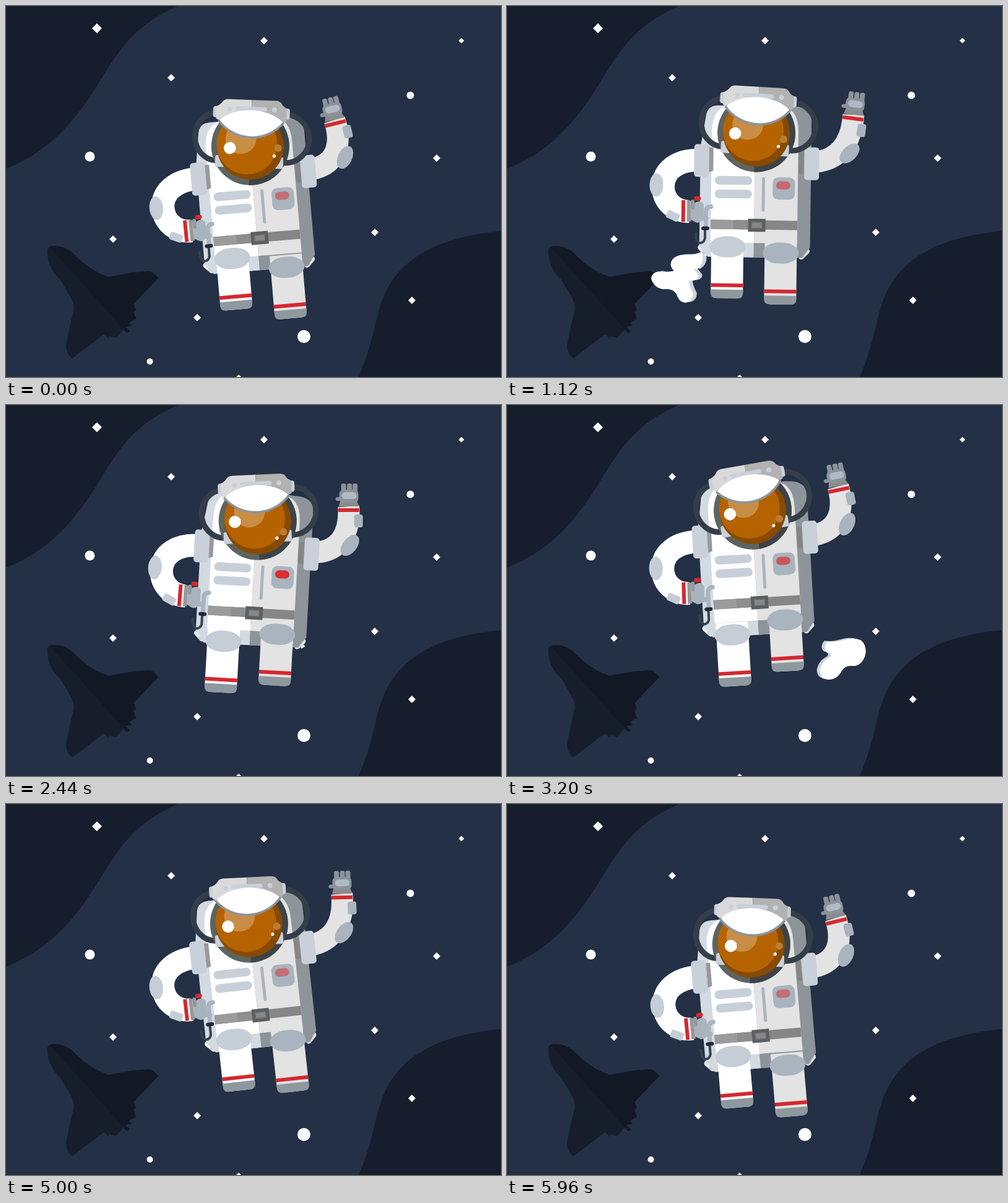
Write an HTML page that moves like this. It is 800x600 px and loops after 6 s.

```html
<!DOCTYPE html>
<html lang="en">
<head>
<meta charset="utf-8">
<title>Waving astronaut</title>
<style>
html, body { margin: 0; width: 100%; height: 100%; overflow: hidden; background: #233045; }
svg { display: block; width: 800px; height: 600px; }
</style>
</head>
<body>
<svg viewBox="0 0 800 600">
  <rect width="800" height="600" fill="#233045"/>
  <g fill="#161d2c">
    <path d="M278 0C215 28 190 60 160 108C125 165 85 230 0 263V0Z"/>
    <path d="M570 600C592 550 596 510 605 485C625 420 680 375 800 364V600Z"/>
  </g>
  <g id="shuttle">
    <path fill="#161d2b" d="M67 400Q65 388 76 388Q92 387 106 398L123 414Q145 432 166 438L205 431L232 429Q238 430 246 440L206 482L210 491L206 495L210 506L199 512L203 517L193 519L200 526L195 529L190 523L178 537L167 534L166 538L158 531L107 570Q98 563 97 550Q101 525 110 490Q109 478 104 470L88 443Q68 425 67 400Z"/>
    <path fill="#121925" d="M71 390Q88 385 106 398L123 414Q145 432 166 438L205 431L232 429Q238 430 246 440L206 482L210 491L206 495L210 506L199 512L203 517L193 519L200 526L196 529Z"/>
  </g>
  <g id="stars" fill="#fff"></g>

  <g id="puffL">
    <g id="puffLShape">
      <path class="neck" d="M323 394Q315 403 295 404L282 420L308 428Q322 420 318 402Z"/>
      <path d="M300 405Q278 401 269 412Q263 422 272 430Q258 434 246 431Q234 434 235 444Q240 458 254 460Q270 458 276 468Q280 482 292 482Q304 479 303 467Q296 454 296 446Q312 447 312 437Q306 430 302 425Q312 414 300 405Z"/>
    </g>
  </g>
  <g id="puffR">
    <g id="puffRShape">
      <path class="neck" d="M486 358Q491 374 512 384L507 404L532 398L530 383Q505 377 494 360Z"/>
      <path d="M516 382Q529 384 542 380Q559 375 570 380Q579 387 578 401Q574 420 559 422Q545 420 539 430Q532 444 517 444Q503 441 504 428Q507 416 516 410Q529 403 515 399Q508 392 516 382Z"/>
    </g>
  </g>

  <g id="body">
    <g stroke-linecap="round" stroke-width="9">
      <path d="M-86 102L-77 111" stroke="#ececec"/>
      <path d="M77 115L86 106" stroke="#e3e3e3"/>
      <path d="M-81 107L-77 111M81 111L77 115" stroke="#cdcdcd" stroke-linecap="butt"/>
    </g>
    <path fill="#d3dbe2" d="M-80 -110Q-78 -128 -60 -128H60V117H-74L-88 100V-60Z"/>
    <path fill="#8d959b" d="M0 -128H60Q90 -128 91 -105V100L78 117H0Z"/>
    <path fill="#fff" d="M-70 94V-85Q-70 -122 -45 -128H0V94Z"/>
    <path fill="#e3e3e3" d="M0 94V-128H45Q70 -122 70 -85V94Z"/>
    <path fill="#d3dbe2" d="M-18 94H0V117H-18Z"/>
    <path fill="#8d959b" d="M0 94H20V117H0Z"/>
    <path fill="#999" d="M-74 -60H-67V-22L-74 -20Z"/>
    <path fill="#858585" d="M71 -54H79V-18L71 -20Z"/>
    <g fill="#c8cfd8">
      <rect x="-64" y="-14" width="60" height="14" rx="7"/>
      <rect x="-64" y="8" width="60" height="14" rx="7"/>
    </g>
    <g fill="#a9b4be">
      <rect x="12" y="-13" width="5" height="56" rx="2.5"/>
      <rect x="29.5" y="-13" width="36" height="36" rx="9"/>
    </g>
    <rect id="lamp" x="35" y="-6.5" width="23" height="13" rx="6.5" fill="#dc2a32"/>
    <rect x="-70" y="57" width="140" height="15" fill="#868686"/>
    <rect x="-70" y="57" width="37" height="15" fill="#9b9b9b"/>
    <rect x="-33" y="57" width="24" height="15" fill="#8e8e8e"/>
    <rect x="-9.5" y="54.5" width="28" height="21" fill="#5c5f60"/>
    <rect x="-4" y="60" width="17" height="10" fill="#858887" stroke="#6b6e6f" stroke-width="1.5"/>

    <g id="legL"></g>
    <g id="legR"></g>

    <g fill="none" stroke-linecap="round">
      <path d="M-79 72V88Q-81 95 -88 95Q-94 93 -94 80" stroke="#37434d" stroke-width="4"/>
      <path d="M-70 36Q-78 36 -78 45V66" stroke="#a9b5c0" stroke-width="7"/>
      <path d="M-82 71H-75" stroke="#1f2933" stroke-width="6"/>
    </g>
    <g id="armL">
      <path d="M-86 -39C-123 -40 -146 -22 -146 4C-146 29 -125 45 -104 44" fill="none" stroke="#fff" stroke-width="37"/>
      <ellipse cx="-157" cy="2" rx="11" ry="19" fill="#c5cdd6"/>
      <rect x="-140" y="45" width="21" height="13" rx="3" transform="rotate(25 -130 51)" fill="#c5cdd6"/>
      <rect x="-116" y="26" width="6" height="35" fill="#d4282f"/>
      <path d="M-107 26H-102L-100 60L-107 61Z" fill="#9a9795"/>
      <rect x="-96" y="19.5" width="11" height="7" rx="3" fill="#d4282f"/>
      <path d="M-102 34V28Q-99 24 -96 28V31Q-86 24 -80 32V55Q-84 63 -92 62L-101 57Z" fill="#a9b3bd"/>
      <path d="M-84 55H-76" stroke="#a9b3bd" stroke-width="8" stroke-linecap="round"/>
      <path d="M-98 28V38" stroke="#919ba4" stroke-width="6" stroke-linecap="round"/>
    </g>
    <rect x="-98" y="-65" width="24" height="53" rx="5" fill="#c9d0d9"/>

    <path id="sleeve" fill="none" stroke="#e3e3e3" stroke-width="35"/>
    <g id="forearm">
      <ellipse cx="153" cy="-53" rx="11.5" ry="19.5" transform="rotate(38 153 -53)" fill="#a9b4be"/>
      <rect x="160" y="-103" width="14" height="21" rx="4" fill="#a9b4be"/>
      <rect x="134" y="-113" width="34" height="6" fill="#d4282f"/>
      <path d="M135 -116L138 -126H164L168 -116Z" fill="#8b8b8b"/>
      <g fill="#8a929a">
        <rect x="130" y="-131" width="14" height="6" rx="3"/>
        <rect x="139" y="-153" width="8" height="20" rx="3"/>
        <rect x="148.5" y="-153" width="8" height="20" rx="3"/>
        <rect x="157.5" y="-153" width="8" height="20" rx="3"/>
        <rect x="136" y="-143" width="31" height="21" rx="7"/>
      </g>
      <rect x="140" y="-139" width="24" height="11" rx="5.5" fill="#b0bac4"/>
    </g>
    <rect x="80" y="-62" width="24" height="53" rx="5" fill="#c9d0d9"/>

    <g transform="translate(2 -84)">
      <g id="shell">
        <g fill="none" stroke="#343e48" stroke-width="9">
          <ellipse cx="-54" cy="-14" rx="36" ry="39"/>
          <ellipse cx="56" cy="-14" rx="39" ry="39"/>
        </g>
        <circle r="63" fill="#5d6462"/>
        <path d="M0 -63A63 63 0 0 1 0 63Z" fill="#3d4447"/>
        <g fill="#c9d0d9">
          <rect x="-56" y="16" width="16" height="19" rx="3"/>
          <rect x="40" y="16" width="14" height="19" rx="3"/>
        </g>
        <circle r="54" fill="#874a00"/>
      </g>
      <circle cx="-5" cy="-4" r="49" fill="#b56300"/>
      <circle cx="-14" cy="-14" r="25" fill="#fff" opacity=".27"/>
      <circle id="shine" r="9.8" fill="#fff"/>
      <g id="dots">
        <circle cx="45" cy="3" r="6" fill="#bb7c34"/>
        <circle cx="38.5" cy="16" r="2.6" fill="#fff"/>
      </g>
      <g id="cap">
        <g fill="#c9d0d9">
          <rect x="-62" y="-63" width="12" height="18" rx="4"/>
          <rect x="50" y="-63" width="12" height="18" rx="4"/>
        </g>
        <path d="M-57 -43V-63Q-50 -66 -47 -71Q-44 -75 -38 -75H0V-40H-51Z" fill="#dadada"/>
        <path d="M57 -43V-63Q50 -66 48 -71Q45 -75 38 -75H0V-40H51Z" fill="#b2b2b2"/>
        <g fill="#c9d0d9">
          <circle cx="-35" cy="-59" r="4"/>
          <circle cx="37" cy="-60" r="4"/>
          <rect x="-26" y="-64" width="51" height="7" rx="3.5"/>
        </g>
        <path d="M-52 -41C-25 -7 25 -7 52 -41" fill="none" stroke="#8b949b" stroke-width="6"/>
        <path d="M-51 -41C-25 -64 25 -64 51 -41C25 -8 -25 -8 -51 -41Z" fill="#fff"/>
      </g>
    </g>
  </g>
</svg>
<script>
const LOOP = 6000, STAGE = 2000, STEP = 40, TAU = Math.PI * 2;
const $ = id => document.getElementById(id);
const set = (id, value, name = 'transform') => $(id).setAttribute(name, value);

// Two thrusts and a fall: the pose at the start of each stage.
const height = [310.7, 275, 244];
const tilt = [-4.9, 4.6, -7.6];

function staged(values, t) {
  const i = Math.floor(t / STAGE), u = t % STAGE / STAGE;
  const from = values[i], to = values[(i + 1) % values.length];
  return from + (to - from) * (1 - Math.cos(Math.PI * u)) / 2;
}

const cycle = (t, period) => Math.cos(TAU * t / period);

function rotate(x, y, deg) {
  const a = deg * TAU / 360, c = Math.cos(a), s = Math.sin(a);
  return [x * c - y * s, x * s + y * c];
}

function buildLeg(id, cloth, pad) {
  $(id).innerHTML = `
    <path d="M-26 -20H26V73Q26 83 16 83H-16Q-26 83 -26 73Z" fill="${cloth}"/>
    <path d="M-26 69H26V75Q26 83 18 83H-18Q-26 83 -26 75Z" fill="#8e989e"/>
    <rect x="-26" y="59" width="52" height="6" fill="#d4282f"/>
    <rect x="-29" y="-17" width="58" height="34" rx="26" ry="17" fill="${pad}"/>`;
}

function buildPuff(id, dx) {
  const shape = $(id + 'Shape').innerHTML;
  $(id).innerHTML = `<g fill="#ccd3da" transform="translate(${dx} -1)">${shape}</g><g fill="#fff">${shape}</g>`;
}

function buildStars() {
  const diamonds = [[147, 36, 8], [417, 56, 6], [267, 116, 6], [736, 56, 4.5], [696, 246, 6], [596, 366, 6],
    [656, 476, 6], [309, 504, 6], [173, 377, 6], [376, 600, 4]];
  const discs = [[653.5, 144.5, 6], [135.5, 243.5, 8], [481.5, 534.5, 10.5], [232.5, 575, 5]];
  $('stars').innerHTML =
    diamonds.map(([x, y, r]) => `<path d="M${x} ${y - r}l${r} ${r}l${-r} ${r}l${-r} ${-r}z"/>`).join('') +
    discs.map(([x, y, r]) => `<circle cx="${x}" cy="${y}" r="${r}"/>`).join('');
}

const puffs = [
  { id: 'puffL', start: 400, port: [-82, 107], from: [319, 397], mid: [275, 440], drift: -1 },
  { id: 'puffR', start: 2400, port: [82, 111], from: [489, 359], mid: [543, 408], drift: 1 }
];

// A puff grows out of its nozzle, breaks off, drifts and shrinks.
function drawPuff({ id, start, port, from, mid, drift }, t, y, r) {
  const GROW = 780, LIFE = 1340, age = t - start;
  const shown = age > 0 && age < LIFE;
  set(id, shown ? 'inline' : 'none', 'display');
  if (!shown) return;
  const growing = age < GROW;
  if (growing) {
    const [px, py] = rotate(...port, r);
    const k = Math.sin(age / GROW * Math.PI / 2);
    set(id, `translate(${400 + px} ${y + py}) scale(${k}) translate(${-from[0]} ${-from[1]})`);
  } else {
    const u = (age - GROW) / (LIFE - GROW);
    set(id, `translate(${mid[0] + drift * 50 * u} ${mid[1] + 6 * u}) scale(${1 - u * u}) translate(${-mid[0]} ${-mid[1]})`);
  }
  for (const neck of $(id).querySelectorAll('.neck')) neck.style.display = growing ? '' : 'none';
}

function draw(t) {
  const y = staged(height, t), r = staged(tilt, t);
  const sway = cycle(t, LOOP);
  const wave = .3 - 9.2 * cycle(t, LOOP / 2);

  set('body', `translate(400 ${y}) rotate(${r})`);
  set('legL', `translate(-42.5 ${104.6 - 10.3 * sway})`);
  set('legR', `translate(43.8 ${105.6 + 10.3 * sway})`);
  set('armL', `translate(-1.5 0) rotate(${.5 - 1.2 * sway} -90 -38)`);
  set('lamp', .75 - .25 * cycle(t, LOOP / 6), 'opacity');

  const [cx, cy] = rotate(1, -21, wave), [ex, ey] = rotate(-2, -63, wave);
  set('sleeve', `M92 -38C138 -40 ${153 + cx} ${cy - 53} ${153 + ex} ${ey - 53}`, 'd');
  set('forearm', `rotate(${wave} 153 -53)`);

  const nod = `rotate(${6.9 * sway})`;
  set('shell', nod);
  set('cap', nod);
  set('shine', `rotate(${2.9 * sway - 2.9}) translate(${2 * sway - 35.2} 0)`);
  set('dots', `rotate(${10.7 - 6 * sway})`);

  for (const p of puffs) drawPuff(p, t, y, r);
}

buildStars();
buildLeg('legL', '#fff', '#c5cdd6');
buildLeg('legR', '#e3e3e3', '#a9b4be');
buildPuff('puffL', 6);
buildPuff('puffR', -5);

const begin = performance.now();
function tick() {
  const t = (performance.now() - begin) % LOOP;
  draw(Math.floor(t / STEP) * STEP);
  requestAnimationFrame(tick);
}
tick();
</script>
</body>
</html>
```
